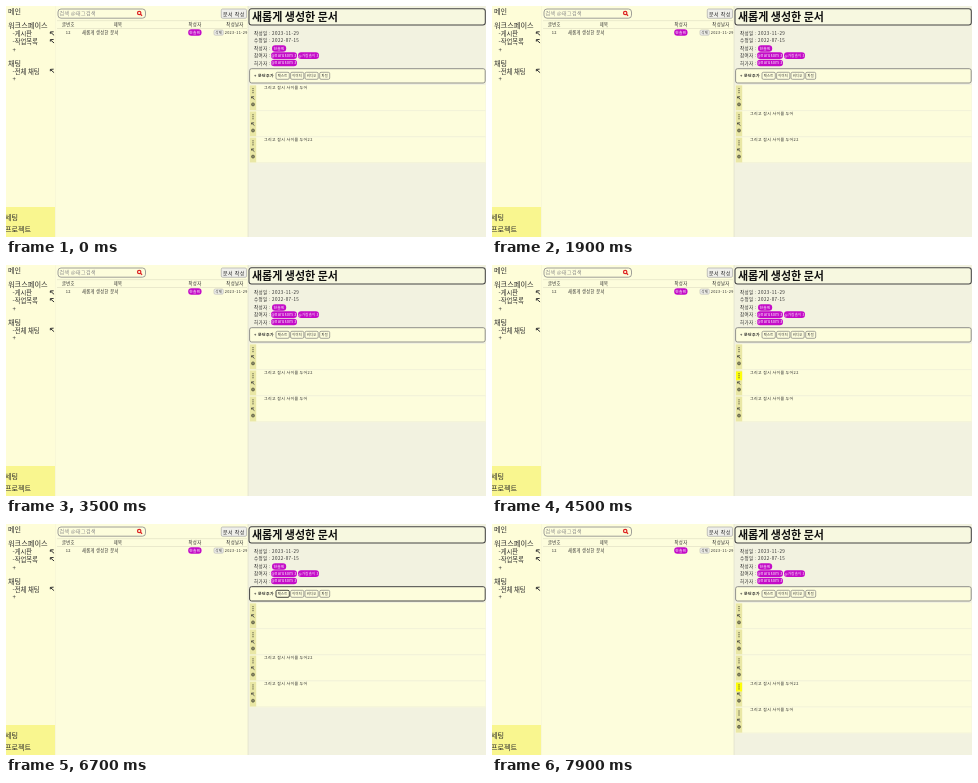
Animation of 480 by 231 pixels, one loop 8000 ms. Source, as an HTML page with a canvas:

```html
<!DOCTYPE html>
<html lang="ko">
<head>
<meta charset="utf-8">
<title>문서</title>
<style>
html, body { margin: 0; width: 100%; height: 100%; overflow: hidden; background: #fdfddc; }
canvas { display: block; width: 480px; height: 231px; }
</style>
</head>
<body>
<canvas id="stage"></canvas>
<script>
const LOOP = 8000;
const W = 480, H = 231;
const canvas = document.getElementById('stage');
const g = canvas.getContext('2d');
const dpr = window.devicePixelRatio || 1;
canvas.width = W * dpr;
canvas.height = H * dpr;

const INK = '#2c2c2c', CREAM = '#fdfddc', TAG = '#c40cc8', GLOW = '#ffff0a';
const TOP = 79, PITCH = 26.1, GRIP = 5.6;
const TEXT = { A: '그리고 잠시 사이를 두어', B: '그리고 잠시 사이를 두어22', _: '' };

// [start, block order, hovered icon (block * 3 + icon, -1 none), toolbar hover]
// toolbar hover: 0 none, 1 box, 2 box and text button
const STEPS = [
  [0, 'A_B', -1, 0],
  [300, 'A_B', 3, 0],
  [600, 'A_B', 4, 0],
  [900, 'A_B', 3, 0],
  [1700, '_AB', 0, 0],
  [1900, '_AB', -1, 0],
  [2400, '_AB', 3, 0],
  [3200, '_BA', 6, 0],
  [3500, '_BA', -1, 0],
  [4300, '_BA', 4, 0],
  [4500, '_BA', 3, 0],
  [5200, '_BA', -1, 0],
  [5900, '_BA', 8, 0],
  [6000, '_BA', 4, 0],
  [6100, '_BA', 0, 0],
  [6200, '_BA', -1, 1],
  [6300, '_BA', -1, 2],
  [6600, '__BA', -1, 2],
  [7200, '___BA', -1, 2],
  [7300, '___BA', -1, 0],
  [7500, '___BA', 7, 0],
  [7600, '___BA', 8, 0],
  [7700, '___BA', 9, 0],
  [7800, '___BA', 10, 0],
  [7900, '___BA', 9, 0]
];

// Grips dragged from one block to another
const DRAGS = [
  { start: 1000, time: 500, drop: 1700, from: 1, to: 0 },
  { start: 2600, time: 300, drop: 3200, from: 1, to: 2 }
];

function rect(x, y, w, h, color) {
  g.fillStyle = color;
  g.fillRect(x, y, w, h);
}

function box(x, y, w, h, r, fill, stroke, line = 0.7) {
  g.beginPath();
  g.roundRect(x, y, w, h, r);
  if (fill) { g.fillStyle = fill; g.fill(); }
  if (stroke) { g.strokeStyle = stroke; g.lineWidth = line; g.stroke(); }
}

// Small text is set slightly smaller and looser
function text(str, x, mid, size, opt = {}) {
  const small = size < 6;
  const px = small ? size * 0.9 : size;
  g.font = `${opt.weight || 400} ${px}px "Noto Sans CJK KR", "Noto Sans CJK", "Noto Sans", sans-serif`;
  g.letterSpacing = (small ? size * 0.08 : 0) + 'px';
  g.textAlign = opt.align || 'left';
  g.textBaseline = 'alphabetic';
  g.fillStyle = opt.color || INK;
  g.fillText(str, x, mid + px * 0.37);
}

function pill(str, x, mid, w, size = 4.2) {
  box(x, mid - 3.3, w, 6.6, 3.2, TAG);
  text(str, x + w / 2, mid, size, { align: 'center', color: '#fff' });
}

function button(str, x, y, w, h, size, stroke, line, fill = CREAM, weight = 400) {
  box(x, y, w, h, 1.3, fill, stroke, line);
  text(str, x + w / 2, y + h / 2, size, { align: 'center', weight });
}

function pencil(x, y, s = 0.85) {
  g.strokeStyle = '#333';
  g.lineWidth = 0.9 * s;
  g.beginPath();
  g.moveTo(x - 1.7 * s, y - 1.1 * s);
  g.lineTo(x + 1.7 * s, y + 1.8 * s);
  g.moveTo(x - 1.7 * s, y + 0.5 * s);
  g.lineTo(x - 1.7 * s, y - 1.2 * s);
  g.lineTo(x + 1.3 * s, y - 1.4 * s);
  g.stroke();
}

function dots(x, y) {
  for (const d of [-2, 0, 2]) rect(x - 0.5, y + d - 0.6, 1, 1.2, '#55553c');
}

function gear(x, y) {
  g.beginPath();
  g.arc(x, y, 1.5, 0, Math.PI * 2);
  g.fillStyle = '#8a8a68';
  g.fill();
  g.strokeStyle = '#55553c';
  g.lineWidth = 0.7;
  g.stroke();
}

function sidebar() {
  rect(0, 0, 49, H, '#fefdd8');
  rect(0, 201, 49, 30, '#f9f68f');
  rect(49, 0, 0.6, H, '#f5f4d4');
  text('메인', 2, 5.5, 7.1);
  text('워크스페이스', 2, 19.2, 7.2);
  text('-게시판', 6.5, 27.5, 6.3);
  text('-작업목록', 6.5, 35.6, 6.3);
  text('+', 6.5, 43.3, 6);
  text('채팅', 2, 57.2, 7.1);
  text('-전체 채팅', 6.5, 65.2, 6.4);
  text('+', 6.5, 73.2, 6);
  for (const y of [27.3, 35, 64.7]) pencil(46.2, y, 1.1);
  text('세팅', -1, 211, 7.1);
  text('프로젝트', -1, 223.8, 7.1);
}

function list() {
  box(52, 3, 87.5, 9.2, 3, CREAM, '#888', 0.8);
  text('검색 @태그검색', 53.5, 7.6, 5.5, { color: '#888' });
  g.strokeStyle = '#d22';
  g.lineWidth = 1.2;
  g.beginPath();
  g.arc(133.2, 7, 1.7, 0, Math.PI * 2);
  g.moveTo(134.5, 8.3);
  g.lineTo(136.1, 9.8);
  g.stroke();
  button('문서 작성', 215.3, 3, 25.2, 9.3, 5.6, '#aaa', 0.7, '#efefea');

  rect(51, 14.5, 190, 0.6, '#deddc2');
  rect(51, 22, 190, 0.6, '#deddc2');
  const mid = { align: 'center' };
  text('글번호', 62.3, 18.4, 4.7, mid);
  text('제목', 112, 18.4, 4.7, mid);
  text('작성자', 189, 18.4, 4.8, mid);
  text('작성날자', 229, 18.4, 4.8, mid);
  text('12', 62.3, 26.5, 4.5, mid);
  text('새롭게 생성한 문서', 76, 26.5, 4.7);
  pill('한솔빈', 182.2, 26.5, 13.4);
  button('삭제', 208, 24, 9.3, 5.2, 3.7, '#aaa', 0.5, '#efefea');
  text('2023-11-29', 218.7, 26.5, 4.25);
}

function heading() {
  rect(242, 0, 238, H, '#f2f2e0');
  rect(241.7, 0, 0.7, H, '#dfdfca');
  box(243, 2.8, 236.3, 16.2, 2.5, '#f7f8e0', '#444', 1.05);
  text('새롭게 생성한 문서', 246, 11, 11, { weight: 700, color: '#111' });
  const rows = ['작성일 : 2023-11-29', '수정일 : 2022-07-15', '작성자 :', '참여자 :', '허가자 :'];
  rows.forEach((row, i) => text(row, 248, 27.3 + i * 7.5, 5));
  pill('한솔빈', 266, 42.5, 14.2);
  pill('@narusom 3', 265, 49.6, 26, 4.2);
  pill('@가람솔이 3', 292, 49.6, 21, 3.7);
  pill('@narusom 3', 265, 57, 26, 4.2);
}

function toolbar(hover) {
  box(243.6, 62.7, 235.6, 14.3, 2, CREAM, hover ? '#444' : '#777', hover ? 1 : 0.8);
  text('+ 문단추가', 248, 69.8, 4.4, { weight: 600 });
  [['텍스트', 270, 13.3], ['이미지', 284.6, 13.2], ['비디오', 299, 13.2], ['파일', 313.7, 10]]
    .forEach(([name, x, w], i) => {
      const on = hover === 2 && !i;
      button(name, x, 66.3, w, 7, 3.6, on ? '#333' : '#777', on ? 0.9 : 0.65, CREAM, 500);
    });
}

function glow(y) {
  rect(244, y - 4.2, 6.1, 8.7, GLOW);
}

function block(i, kind, hover, target) {
  const y = TOP + i * PITCH;
  rect(243.5, y, 236, PITCH - 0.2, CREAM);
  rect(243.5, y + PITCH - 0.9, 236, 0.7, '#efefd8');
  rect(243.8, y + 0.4, 6.4, PITCH - 1.3, target ? '#c4f0a8' : '#e9e7a5');
  [dots, pencil, gear].forEach((icon, k) => {
    const cy = y + [GRIP, 12.9, 19.4][k];
    if (hover === i * 3 + k) glow(cy);
    icon(247, cy);
  });
  text(TEXT[kind], 258, y + 2.6, 4.4);
}

// Height of the dragged grip, or null; the screen refreshes ten times a second
function ghostY(t) {
  const d = DRAGS.find(d => t >= d.start + 100 && t < d.drop);
  if (!d) return null;
  const k = Math.min(1, (Math.floor(t / 100) * 100 - d.start) / d.time);
  const ease = 1 - Math.pow(1 - k, 1.5);
  return TOP + GRIP + PITCH * (d.from + (d.to - d.from) * ease);
}

function draw(now) {
  const t = now % LOOP;
  const [, order, hover, bar] = STEPS.filter(s => s[0] <= t).pop();
  const ghost = ghostY(t);
  const target = ghost === null ? -1 : Math.floor((ghost - TOP) / PITCH);
  g.setTransform(dpr, 0, 0, dpr, 0, 0);
  rect(0, 0, W, H, CREAM);
  sidebar();
  list();
  heading();
  toolbar(bar);
  [...order].forEach((kind, i) => block(i, kind, hover, i === target));
  if (ghost !== null) {
    glow(ghost);
    dots(247, ghost);
  }
}

const start = performance.now();
function tick() {
  draw(Math.max(0, performance.now() - start));
  requestAnimationFrame(tick);
}
tick();
</script>
</body>
</html>
```
